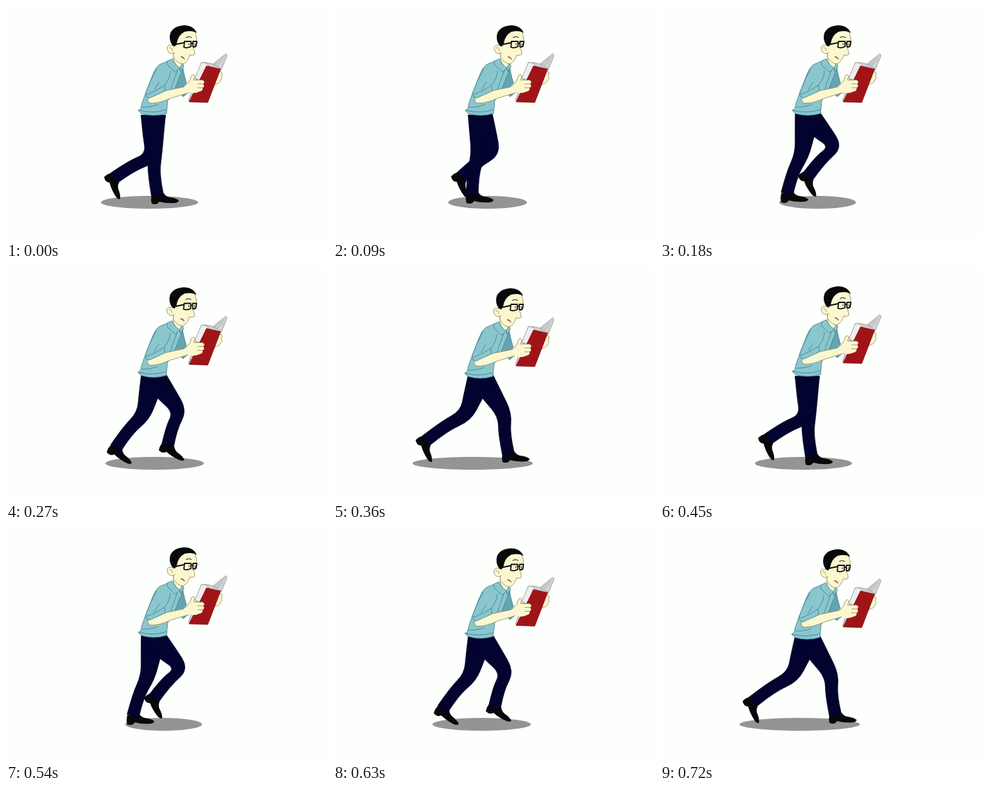
These frames come from a looping animation (498x362 px, 810 ms). An HTML page:

```html
<!DOCTYPE html>
<html lang="en">
<head>
<meta charset="utf-8">
<title>Walking reader</title>
<style>
  html, body { margin: 0; width: 100%; height: 100%; overflow: hidden; background: #fdfffc; }
  svg { display: block; width: 100%; height: 100%; }
  .leg { fill: #030330; stroke: #01011f; stroke-width: .6; stroke-linejoin: round; }
  .skin { fill: #fbf7cf; stroke: #8a7d55; stroke-width: .8; stroke-linejoin: round; }
  .shirt { fill: #8ac6ce; stroke: #43838f; stroke-width: .9; stroke-linejoin: round; }
  .shade { fill: #64a5b1; }
  .page { fill: #d3d3d5; stroke: #8e8e92; stroke-width: .8; stroke-linejoin: round; }
  .fold { fill: none; stroke: #43838f; stroke-width: .9; }
  .ink { fill: none; stroke: #0b0b0e; stroke-width: 1.8; stroke-linejoin: round; }
  .thin { stroke-width: 1; }
</style>
</head>
<body>
<svg viewBox="0 0 498 362">
  <defs>
    <path id="shoe" fill="#08080b" d="M-9-1L-10 7L-9 13Q-4 15 0 13L3 10Q14 13 27 12Q33 11 33 8Q28 4 18 3Q12 1 10-3Z"/>
  </defs>

  <ellipse id="shadow" fill="#949494" cy="305" ry="10"/>
  <use class="shoe" href="#shoe"/>
  <path class="leg"/>
  <use class="shoe" href="#shoe"/>
  <path class="leg"/>

  <g id="body">
    <path class="shirt shade" d="M265 104L274 94Q276 108 284 133L275 141L263 127Z"/>
    <path class="skin" d="M260 70L260 84Q264 94 271 99L274 91L272 82Z"/>
    <path class="shirt" d="M250 86L238 91Q231 97 228 106L217 134L211 151L209 160L205 162L210 167Q229 173 249 167L251 147Q262 132 268 113L275 97L270 99L254 84Z"/>
    <path class="fold" d="M266 100Q258 120 251 145M236 153Q222 158 211 157M206 162Q228 168 249 161"/>
    <path class="shirt" d="M250 86L258 82Q262 92 270 96L263 103L251 92ZM270 96L274 88L276 94L271 102Z"/>

    <path class="skin" d="M265 45Q276 35 291 37Q297 45 296 60L290 64Q293 70 293 75Q289 78 285 76Q283 85 275 90Q267 90 260 80L260 61Z"/>
    <path fill="#09090c" d="M258 61Q252 52 255 42Q260 31 276 30Q291 30 296 42Q289 37 277 40Q267 45 265 58L262 63Z"/>
    <path class="skin" d="M261 63Q253 58 250 64Q250 74 258 74L262 72"/>
    <path d="M253 65Q258 64 258 70" fill="none" stroke="#8a7d55" stroke-width=".8"/>
    <path class="ink" d="M262 60L276 57M277 55H287L287 63Q281 66 276 64ZM288 58H290M290 55H296L295 62Q292 65 290 63Z"/>
    <path class="ink thin" d="M279 49Q284 46 288 49M284 58V61M293 58V61"/>
    <path d="M271 79Q275 79 277 83" fill="none" stroke="#94423a" stroke-width="1.3"/>

    <path class="skin" d="M222 141Q217 148 224 151Q236 152 256 143L286 134L279 125L246 132Z"/>
    <path class="shirt" d="M234 97Q225 113 217 134L218 141L223 143L247 132L246 123Q255 112 255 101"/>
    <path class="fold" d="M219 137Q231 133 246 123M230 130L238 118"/>
  </g>

  <g id="book">
    <path class="page" d="M320 91L341 74L343 77L334 99Z"/>
    <path class="page" d="M283 147L303 88Q318 86 333 97L309 145Z"/>
    <path class="page" style="fill:#eee" d="M293 112L303 88Q310 87 315 93L300 115Z"/>
    <path d="M321 93L339 79M324 95L337 84" stroke="#aaaaae"/>
    <path class="skin" d="M326 107Q329 101 334 102Q337 105 334 109Q337 112 333 115Q333 120 323 122Z"/>
    <path d="M311 93L333 98L313 150L284 149Z" fill="#a01418" stroke="#79090d" stroke-width=".7"/>
    <path class="skin" style="stroke:none" d="M276 126Q280 119 285 116L288 108Q292 105 293 109L291 115L305 115Q310 118 306 121Q309 125 305 127Q306 132 300 133Q292 137 283 134Z"/>
    <path d="M278 124L285 116L288 108Q292 105 293 109L291 115L305 115Q310 118 306 121M297 121H306M297 127H305" fill="none" stroke="#8a7d55" stroke-width=".8"/>
  </g>
</svg>
<script>
// One leg's full stride; the other leg is three poses ahead.
const STRIDE = [
  { knee: [231, 230], ankle: [235, 294], tilt: 0 },   // standing
  { knee: [220, 232], ankle: [197, 292], tilt: 0 },   // pushing back
  { knee: [206, 231], ankle: [144, 270], tilt: 60 },  // heel off
  { knee: [226, 236], ankle: [168, 267], tilt: 61 },  // trailing
  { knee: [273, 219], ankle: [230, 264], tilt: 55 },  // swinging through
  { knee: [267, 230], ankle: [272, 290], tilt: 0 }    // heel strike
];
const HIP = [228.5, 170];
const LEG_WIDTHS = [38, 30, 22, 18, 19];
const CALF_BOW = 4;
const FRAME_MS = 90;
const FRAMES = 9;

const svg = document.querySelector("svg");
const legs = svg.querySelectorAll(".leg");
const shoes = svg.querySelectorAll(".shoe");
const shadow = svg.getElementById("shadow");

const mix = (a, b, t) => a + (b - a) * t;
const mixPoint = (p, q, t) => p.map((v, i) => mix(v, q[i], t));

// Point beside p, at a distance to the left of the direction from -> to.
function beside(p, from, to, distance) {
  const dx = to[0] - from[0], dy = to[1] - from[1];
  const scale = distance / Math.hypot(dx, dy);
  return [p[0] - dy * scale, p[1] + dx * scale];
}

function poseAt(phase) {
  const a = STRIDE[Math.floor(phase) % 6];
  const b = STRIDE[Math.floor(phase + 1) % 6];
  const t = phase % 1;
  return {
    knee: mixPoint(a.knee, b.knee, t),
    ankle: mixPoint(a.ankle, b.ankle, t),
    tilt: mix(a.tilt, b.tilt, t)
  };
}

// Smooth line that bends at every inner point.
function curve(points) {
  const bends = points.slice(1, -1).map((p, i, inner) => {
    const end = i === inner.length - 1 ? points.at(-1) : mixPoint(p, points[i + 2], .5);
    return `Q${p} ${end}`;
  });
  return points[0] + bends.join("");
}

function legPath({ knee, ankle }) {
  const calf = beside(mixPoint(knee, ankle, .5), knee, ankle, CALF_BOW);
  const bones = [HIP, mixPoint(HIP, knee, .5), knee, calf, ankle];
  const edge = side => bones.map((p, i) =>
    beside(p, bones[Math.max(i - 1, 0)], bones[Math.min(i + 1, 4)], side * LEG_WIDTHS[i] / 2));
  return `M${curve(edge(1))}L${curve(edge(-1).reverse())}Z`;
}

// Half a pose per frame, with a quick change of legs in the middle of the loop.
function phaseAt(frame) {
  return Math.max(frame / 2, Math.min(frame - 2, frame / 2 + 1));
}

function draw(time) {
  const phase = phaseAt(Math.floor(time / FRAME_MS) % FRAMES);
  const poses = [poseAt(phase + 3), poseAt(phase)];
  poses.forEach((pose, i) => {
    legs[i].setAttribute("d", legPath(pose));
    shoes[i].setAttribute("transform", `translate(${pose.ankle}) rotate(${pose.tilt})`);
  });

  const reach = phase % 3;
  const left = Math.min(...poses.map(pose => pose.ankle[0] - 12 - pose.tilt / 7));
  const right = 298 + 6 * reach;
  shadow.setAttribute("cx", (left + right) / 2);
  shadow.setAttribute("rx", (right - left) / 2);

  const drop = 3 * Math.max(0, reach - 1);
  svg.getElementById("body").setAttribute("transform", `translate(${-drop / 3} ${drop})`);
  svg.getElementById("book").setAttribute("transform", `translate(0 ${drop * 1.6})`);
}

const start = performance.now();
function tick() {
  draw(performance.now() - start);
  requestAnimationFrame(tick);
}
tick();
</script>
</body>
</html>
```
